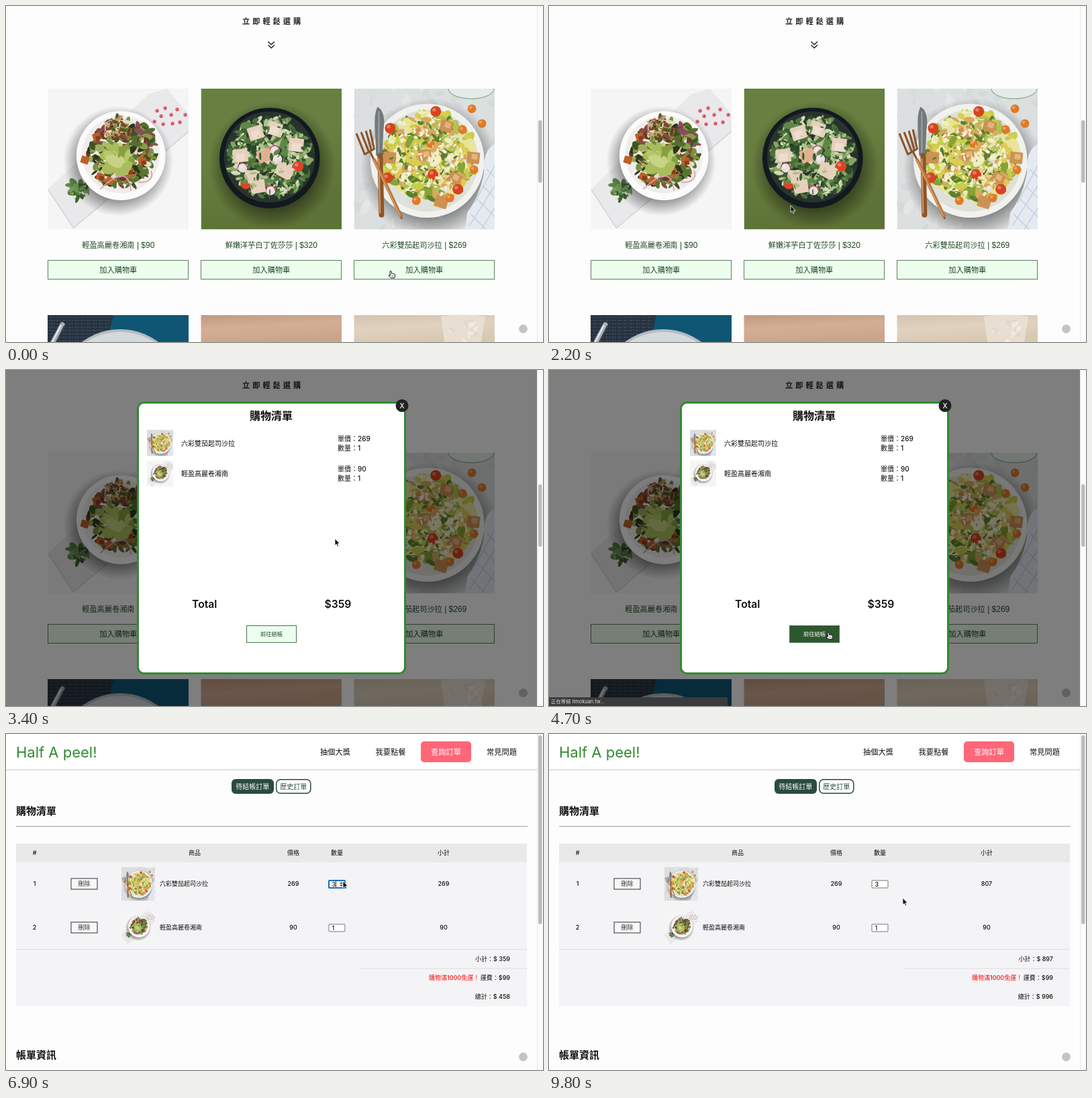
An HTML page for the animation above (9.9 s loop, 800x500 px).

```html
<!DOCTYPE html>
<html lang="zh-Hant">
<head>
<meta charset="utf-8">
<style>
  html, body { margin: 0; width: 100%; height: 100%; overflow: hidden; background: #fdfdfd; }
  svg { display: block; width: 800px; height: 500px; }
  text { font-family: Inter, "Noto Sans CJK TC", "Noto Sans CJK JP", sans-serif; white-space: pre; }
  .price { font: 12px "Liberation Sans", Arial, sans-serif; }
</style>
</head>
<body>
<svg id="stage" viewBox="0 0 800 500"></svg>
<script>
const LOOP = 9900;
const stage = document.getElementById('stage');

// Drawing helpers
const rect = (x, y, w, h, fill, extra = '') =>
  `<rect x="${x}" y="${y}" width="${w}" height="${h}" fill="${fill}" ${extra}/>`;
const circle = (x, y, r, fill, extra = '') =>
  `<circle cx="${x}" cy="${y}" r="${r}" fill="${fill}" ${extra}/>`;
const path = (d, fill, extra = '') => `<path d="${d}" fill="${fill}" ${extra}/>`;
const line = (d, stroke, width, extra = '') =>
  path(d, 'none', `stroke="${stroke}" stroke-width="${width}" ${extra}`);
const text = (x, cy, size, str, fill = '#111', extra = '') =>
  `<text x="${x}" y="${cy + size * 0.37}" font-size="${size}" fill="${fill}" ${extra}>${str}</text>`;
const mid = 'text-anchor="middle"', end = 'text-anchor="end"';
const medium = 'font-weight="500"', bold = 'font-weight="700"';
const use = (id, x, y, size) => `<use href="#${id}" x="${x}" y="${y}" width="${size}" height="${size}"/>`;
const group = (id, body) => `<g id="${id}">${body}</g>`;

function randomizer(seed) {
  return () => (seed = (seed * 16807) % 2147483647) / 2147483647;
}

// Food pieces strewn over a disc
function strew(seed, count, cx, cy, radius, size, colours) {
  const rnd = randomizer(seed * 7919);
  let out = '';
  for (let i = 0; i < count; i++) {
    const a = rnd() * 6.283, d = Math.sqrt(rnd()) * radius;
    const x = (cx + d * Math.cos(a)).toFixed(1), y = (cy + d * Math.sin(a)).toFixed(1);
    const rx = size * (0.5 + rnd()), ry = rx * (0.25 + rnd() * 0.4);
    out += `<ellipse cx="${x}" cy="${y}" rx="${rx.toFixed(1)}" ry="${ry.toFixed(1)}"
      fill="${colours[i % colours.length]}" transform="rotate(${(rnd() * 180) | 0} ${x} ${y})"/>`;
  }
  return out;
}
const dots = (points, r, fill) => points.map(([x, y]) =>
  circle(x, y, r, fill) + circle(x - r * 0.3, y - r * 0.3, r * 0.35, '#fff', 'opacity=".3"')).join('');
const tiles = (points, s, fill) => points.map(([x, y], i) =>
  rect(x - s / 2, y - s / 2, s, s * 0.9, fill, `rx="1.5" transform="rotate(${i * 37 % 50 - 18} ${x} ${y})"`)).join('');
const photo = (id, body) => `<symbol id="${id}" viewBox="0 0 210 210">${body}</symbol>`;
const shadow = (x, y, r) => circle(x, y, r, 'url(#soft)');

const cabbageSalad = photo('cabbage',
  rect(0, 0, 210, 210, '#f6f5f6') +
  path('M150 8L178 0 210 38V64L38 208 0 150Z', '#e9e8ea') +
  line('M0 150L38 208 210 64', '#d4d2d3', 1.5) +
  dots([[163, 33], [169, 41], [175, 29], [184, 39], [193, 31], [205, 39], [159, 49], [172, 53], [186, 52], [197, 50]], 2.6, '#d8505a') +
  strew(8, 40, 46, 150, 15, 5, ['#5c8a45', '#7ba05e', '#3b632f']) +
  shadow(105, 108, 82) + circle(109, 100, 66.5, '#fcfbfb') + circle(109, 98, 58, '#efedec') +
  strew(12, 330, 110, 96, 50, 6, ['#41521f', '#7d8f3f', '#6b3a24', '#9cb05c', '#2e351b', '#a4703c', '#e4dcc6', '#57752f', '#8b4a42']) +
  strew(3, 50, 100, 57, 17, 3.5, ['#7b4a26', '#b58550', '#4a5a26', '#c9a06c']) +
  strew(6, 26, 140, 70, 16, 7, ['#54702d', '#39541f', '#83a04a', '#8d4a5a']) +
  tiles([[73, 72], [78, 132], [121, 123], [141, 109], [92, 138], [55, 107]], 12, '#b9612a') +
  tiles([[75, 74], [80, 134], [123, 125], [143, 111]], 7, '#8a3d1b') +
  strew(9, 22, 107, 103, 19, 11, ['#a9bd5c', '#c6d384', '#86a040', '#b5c869']) +
  line('M78 150Q120 110 124 152M135 140Q160 140 154 122M85 60Q88 45 96 48', '#d3a3b4', 1.8));

const potatoSalad = photo('potato',
  rect(0, 0, 210, 210, 'url(#olive)') +
  shadow(106, 114, 95) + circle(102.5, 103.5, 75, '#12191f') +
  circle(102.5, 102, 68, '#28332d') +
  strew(21, 420, 103, 102, 61, 6, ['#4c7138', '#86a463', '#2c4a2a', '#afc18b', '#5f8748', '#d3dab8', '#3a5c33']) +
  dots([[62, 118], [110, 92], [104, 152], [80, 128], [114, 105]], 7, '#ecdde0') +
  line('M55 118a7 7 0 0 1 14 0M103 92a7 7 0 0 1 14 0M97 152a7 7 0 0 1 14 0', '#c44a68', 1.5) +
  dots([[145, 116], [67, 142]], 8, '#dc4326') +
  tiles([[82, 67], [109, 61], [142, 85], [59, 101], [95, 101], [123, 121], [76, 133], [85, 147], [126, 125]], 22, '#e6cfbd') +
  tiles([[82, 69], [109, 63], [142, 88], [59, 103]], 13, '#eedccd') +
  tiles([[95, 101]], 21, '#dfb190') +
  strew(14, 60, 103, 106, 58, 4, ['#5f8748', '#3a5c33', '#afc18b']));

const cheeseSalad = photo('cheese',
  rect(0, 0, 210, 210, '#dcdfdf') +
  strew(4, 120, 105, 105, 145, 8, ['#d5d9d9', '#e4e6e6', '#dadddd']) +
  `<ellipse cx="175" cy="0" rx="34" ry="15" fill="#e7ebe7" stroke="#88b394" stroke-width="1.2"/>` +
  shadow(113, 118, 104) + circle(109.5, 107.5, 85, '#f1f1ee') +
  circle(109.5, 107.5, 76, '#dfe0d9') +
  strew(33, 480, 113, 102, 66, 8, ['#c6cf49', '#88a236', '#e8e59a', '#5d7f2e', '#f1edc4', '#ddcc52', '#b0c255', '#d9a85c']) +
  tiles([[103, 66], [138, 57], [178, 104], [106, 100], [150, 135], [130, 170], [53, 104]], 19, '#cc9254') +
  tiles([[105, 64], [140, 55], [180, 102], [108, 98], [152, 133]], 9, '#e2b57c') +
  dots([[122, 34], [54, 59], [118, 128], [155, 150], [50, 133]], 8, '#d8431f') +
  dots([[176, 30], [162, 61], [191, 52], [179, 121], [143, 163], [114, 82], [93, 167]], 6.5, '#e07a26') +
  strew(17, 130, 108, 104, 54, 3, ['#f3ecc8', '#faf6e0', '#5f7e30', '#e3cf8e']) +
  path('M35 27Q48 34 44 62L42 102 33 100 31 58Q30 37 35 27Z', '#74797a') +
  line('M37 34L37 96', '#9da2a3', 2) +
  line('M39 100L41 188', '#8c5529', 8, 'stroke-linecap="round"') +
  line('M37 104L39 186', '#d69b65', 2) +
  line('M4 68L16 98 30 90 24 62M11 66L22 94M18 64L26 92M24 94L71 193', '#8b5228', 3, 'stroke-linejoin="round" stroke-linecap="round"') +
  line('M30 106L70 190', '#b87640', 5, 'stroke-linecap="round"') + line('M29 106L69 190', '#dfa36a', 1.5) +
  path('M210 83Q192 92 194 125 188 160 169 185L166 210H210Z', '#e4eaf0') +
  line('M198 120L210 132M192 145L210 163M184 165L210 191M174 187L197 210M210 115L180 170M210 145L172 205M210 178L190 210', '#bccbdc', 1.2));

const swatch = (id, ...stops) => `<linearGradient id="${id}" x2=".3" y2="1">${stops.map((c, i) =>
  `<stop offset="${i / (stops.length - 1)}" stop-color="${c}"/>`).join('')}</linearGradient>`;

const products = [
  ['cabbage', 62.5, '輕盈高麗卷湘南', 90],
  ['potato', 290.5, '鮮嫩洋芋白丁佐莎莎', 320],
  ['cheese', 518.5, '六彩雙茄起司沙拉', 269],
];

const productCard = ([id, x, name, price]) =>
  use(id, x, 123, 209.5) +
  text(x + 104.8, 355.5, 11.2, `${name}<tspan class="price"> | $${price}</tspan>`, '#1f4a24', mid) +
  rect(x, 378.5, 209, 28, '#edfdee', 'stroke="#5d7f61"') +
  text(x + 104.8, 392.5, 11.2, '加入購物車', '#1f4a24', mid);

const nextRow =
  rect(62, 460, 210, 40, '#0f5674') + path('M62 460H160L150 500H62Z', '#26323f') +
  line('M62 463H158M62 468H157M62 473H156M62 478H155M62 483H154M62 488H153M62 493H152M62 498H151', '#4a5665', 1.2,
    'stroke-dasharray="2 2 4 1"') +
  circle(170, 576, 95, '#b4bcc2') + circle(170, 578, 93, '#d5d9dc') +
  line('M84 474L70 500', '#a9b0b5', 7, 'stroke-linecap="round"') + line('M82 475L69 500', '#e8ebec', 2) +
  line('M87 476L75 500', '#3f464c', 2) +
  rect(290.5, 460, 209.5, 40, 'url(#tan)') + rect(518.5, 460, 209.5, 40, 'url(#beige)') +
  path('M648 462Q680 456 714 462L708 500H653Z', '#ece5da', 'opacity=".75"') +
  strew(40, 16, 681, 482, 20, 5, ['#f0eae0', '#e2d9cc']);

const scrollbar = (y, h) => rect(791, 0, 9, 500, '#fafafa') + rect(791, 0, 1, 500, '#e8e8e8') +
  rect(793, y, 5.5, h, '#bcbcbc', 'rx="2.75"');
const badge = circle(770.5, 480.5, 6.5, '#c4c4c4');

const shop = group('shop',
  rect(0, 0, 800, 500, '#fdfdfd') +
  text(352, 22.5, 11.2, '立即輕鬆選購', '#222', bold + ' letter-spacing="4"') +
  line('M390.5 53L395.3 57.5 400 53M390.5 58L395.3 62.5 400 58', '#222', 1.5) +
  products.map(productCard).join('') + nextRow + badge + scrollbar(170, 93));

const cartItem = (id, name, price, y) =>
  use(id, 210, y, 39) + text(261, y + 20, 10, name, '#111', medium) +
  text(494, y + 13, 10, `單價：${price}`, '#111', medium) + text(494, y + 27, 10, '數量：1', '#111', medium);

const modal = group('modal',
  rect(0, 0, 791, 500, '#000', 'opacity=".5"') +
  rect(196.5, 48.5, 398, 403, '#fff', 'rx="9" stroke="#318a31" stroke-width="3"') +
  circle(590, 53, 9.5, '#222') + text(590, 53, 10, 'X', '#fff', `${mid} ${medium}`) +
  text(395, 68, 16, '購物清單', '#111', `${mid} ${bold}`) +
  cartItem('cheese', '六彩雙茄起司沙拉', 269, 89) +
  group('secondItem', cartItem('cabbage', '輕盈高麗卷湘南', 90, 134.7)) +
  text(277, 348.5, 15.7, 'Total', '#111', 'font-weight="600"') +
  text(494.5, 348.5, 15.7, '<tspan id="cartTotal"></tspan>', '#111', `${mid} font-weight="600"`) +
  rect(358.5, 380.5, 74, 25, '#edfdee', 'id="payButton" stroke="#4a7550"') +
  text(395.5, 393, 8.3, '前往結帳', '#1f4a24', `id="payLabel" ${mid}`) +
  group('status', rect(0, 487, 266, 13, '#3a3b3c') + text(3, 493.5, 7.4, '正在等候 limokuan.tw...', '#e2e2e2')));

const cell = (x, y, str, extra = mid) => text(x, y, 9, str, '#111', `${medium} ${extra}`);
const orderRow = (n, id, name, price, y) =>
  cell(42.5, y, n) + rect(97, y - 8, 39, 16, '#f8f8f8', 'stroke="#333"') + text(116.5, y, 9, '刪除', '#333', mid) +
  use(id, 172, y - 25, 50) + cell(229, y, name, '') + cell(428, y, price) +
  rect(481, y - 5, 24, 11, '#fff', 'rx="1" stroke="#777"');
const nav = (x, str, fill = '#111') => text(x, 27, 11.2, str, fill, `${mid} ${medium}`);

const order = group('order',
  rect(0, 0, 800, 500, '#fdfdfd') + rect(0, 52, 791, 4, 'url(#shade)') + rect(0, 0, 791, 52, '#fff') +
  text(15, 27, 22, 'Half A peel!', '#318a31') +
  nav(490.5, '抽個大獎') + nav(573, '我要點餐') +
  rect(618, 11, 75, 31, '#ff6678', 'rx="5"') + nav(655.5, '查詢訂單', '#fff') + nav(738.5, '常見問題') +
  rect(336, 67, 63, 22, '#2b4a40', 'rx="6"') + text(367.3, 78, 10, '待結帳訂單', '#fff', `${mid} ${medium}`) +
  rect(402.8, 67.8, 51, 20.5, '#fff', 'rx="6" stroke="#2b4a40" stroke-width="1.5"') +
  text(428.3, 78, 10, '歷史訂單', '#2b4a40', `${mid} ${medium}`) +
  text(15, 114, 15, '購物清單', '#111', bold) + rect(15, 136.8, 762, 1.4, '#b2b2b2') +
  rect(15, 163, 761, 28, '#e9e9e9') + rect(15, 191, 761, 214, '#f4f3f5') +
  [[42.5, '#'], [281, '商品'], [428, '價格'], [493, '數量'], [652, '小計']].map(([x, s]) => cell(x, 177, s)).join('') +
  orderRow(1, 'cheese', '六彩雙茄起司沙拉', 269, 223) + orderRow(2, 'cabbage', '輕盈高麗卷湘南', 90, 288) +
  group('focusRing', rect(481, 218, 24, 11, '#fff', 'rx="1" stroke="#1c6fb8" stroke-width="2"') +
    rect(491, 219, 0.8, 9, '#111') + path('M497 222.7L499.5 220 502 222.7ZM497 224.3L499.5 227 502 224.3Z', '#444')) +
  cell(485.5, 223.3, '<tspan id="quantity"></tspan>', '') + cell(485.5, 288.3, '1', '') +
  cell(652, 223, '<tspan id="rowTotal"></tspan>') + cell(652, 288, '90') +
  rect(15, 320, 761, 1, '#dedee0') + rect(528, 348.5, 248, 1, '#dedee0') +
  cell(751, 335, '小計：$ <tspan id="subtotal"></tspan>', end) +
  text(630, 363, 9, '購物滿1000免運！', '#f01414', medium) + cell(751, 363, '運費：$99', end) +
  cell(751, 391, '總計：$ <tspan id="grandTotal"></tspan>', end) +
  text(15, 477.5, 15, '帳單資訊', '#111', bold) + badge + scrollbar(2, 281));

const pointer = group('pointer',
  group('arrow', path('M0 0V10.2L2.3 8.1 3.9 11.5 5.6 10.7 4.1 7.4H7.2Z', '#111', 'stroke="#fff" stroke-width=".8"')) +
  group('hand', path('M-.2 1Q.8-.7 2 1L2.4 4.2Q3.5 3.2 4.3 4.4 5.5 3.7 6.2 5 7.8 4.5 7.7 6.5L6.8 10.7H1.3L-2 7Q-1.7 5.4.5 7Z', '#fff',
    'stroke="#111" stroke-width="1" stroke-linejoin="round"') + line('M3 6.5V9M5 6.5V9', '#111', 0.6)));

stage.innerHTML = `<defs>
  ${swatch('olive', '#697f42', '#687f40', '#5d7236')}
  ${swatch('tan', '#c29a82', '#d3ae95', '#cba58b')}
  ${swatch('beige', '#d5c3ac', '#e0d2c0', '#d9c8b2')}
  <radialGradient id="soft"><stop offset=".7" stop-opacity=".4"/><stop offset="1" stop-opacity="0"/></radialGradient>
  <linearGradient id="shade" x2="0" y2="1"><stop stop-color="#ddd"/><stop offset="1" stop-color="#fdfdfd"/></linearGradient>
  ${cabbageSalad}${potatoSalad}${cheeseSalad}</defs>` + shop + modal + order + pointer;

// Pointer stops: time, x, y
const stops = [
  [0, 572, 394], [600, 572, 394], [1100, 492, 243], [1300, 492, 243], [1700, 589, 51], [1900, 589, 51],
  [2200, 360, 297], [2700, 168, 391], [3100, 168, 391], [3400, 490, 251], [3700, 490, 251], [4300, 415, 390],
  [5400, 415, 390], [6200, 502, 219], [7000, 502, 219], [7600, 527, 244], [LOOP, 527, 244],
];

function pointerAt(t) {
  const i = stops.findIndex(s => s[0] > t);
  const [t0, x0, y0] = stops[i - 1], [t1, x1, y1] = stops[i];
  const p = (t - t0) / (t1 - t0), e = p * p * (3 - 2 * p);
  return [x0 + (x1 - x0) * e, y0 + (y1 - y0) * e];
}

const el = id => document.getElementById(id);
const show = (id, on) => el(id).setAttribute('display', on ? 'inline' : 'none');
const write = (id, value) => { el(id).textContent = value; };
const within = (t, ...spans) => spans.some(([a, b]) => t >= a && t < b);

function render(t) {
  const paying = within(t, [4200, 4900]);
  const quantity = t < 6400 ? 1 : t < 6800 ? 2 : 3;
  const rowTotal = t < 7600 ? 269 : 807;

  show('shop', t < 4900);
  show('order', t >= 4900);
  show('modal', within(t, [600, 1900], [3100, 4900]));
  show('secondItem', t > 3000);
  show('status', within(t, [4500, 4900]));
  write('cartTotal', t < 3000 ? '$269' : '$359');
  el('payButton').setAttribute('fill', paying ? '#2d572f' : '#edfdee');
  el('payLabel').setAttribute('fill', paying ? '#fff' : '#1f4a24');

  show('focusRing', within(t, [6300, 7600]));
  write('quantity', quantity);
  write('rowTotal', rowTotal);
  write('subtotal', rowTotal + 90);
  write('grandTotal', rowTotal + 90 + 99);

  const hand = paying || within(t, [0, 600], [1600, 1900], [2650, 3100]);
  show('hand', hand);
  show('arrow', !hand);
  el('pointer').setAttribute('transform', `translate(${pointerAt(t)})`);
}

function tick() {
  render(performance.now() % LOOP);
  requestAnimationFrame(tick);
}
tick();
</script>
</body>
</html>
```
